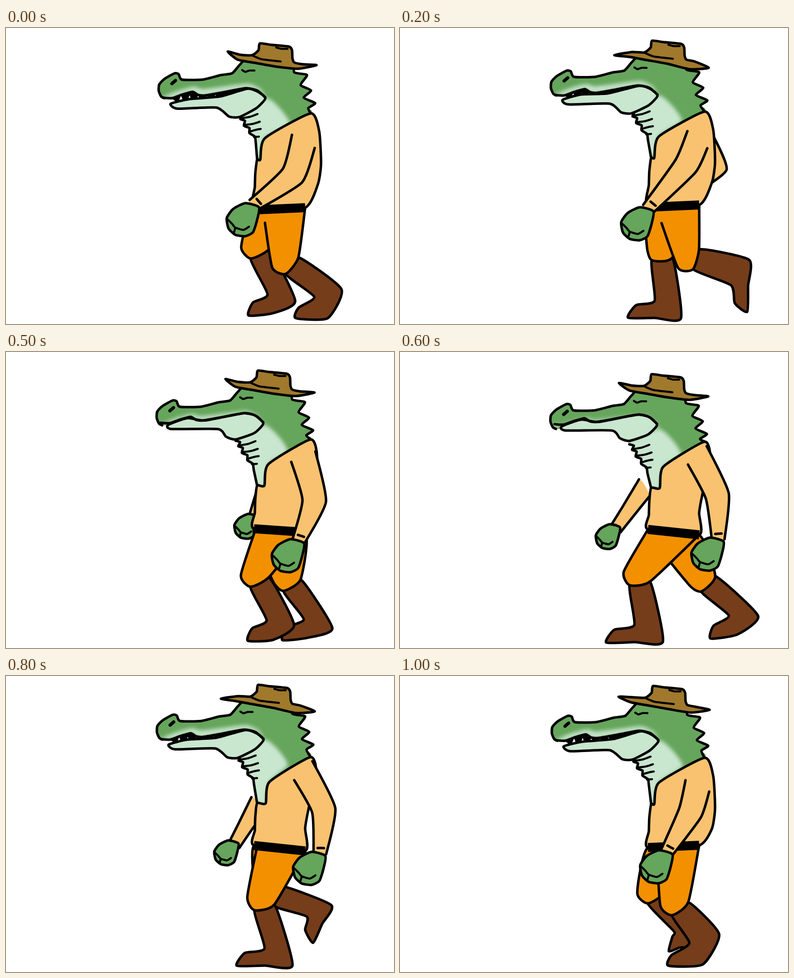
Recreate the animation shown at these times as an HTML page. Size 856 px wide and 654 px high, loop 1100 ms.

```html
<!DOCTYPE html>
<html lang="en">
<head>
<meta charset="utf-8">
<title>Walking crocodile</title>
<style>
  html, body { margin: 0; width: 100%; height: 100%; overflow: hidden; background: #fff; }
  svg { display: block; width: 100%; height: 100%; }
</style>
</head>
<body>
<svg id="stage" viewBox="0 0 856 654">
  <defs>
    <clipPath id="headClip"><path id="clipShape"/></clipPath>
    <filter id="soft" x="-20%" y="-30%" width="140%" height="160%"><feGaussianBlur stdDeviation="4"/></filter>
  </defs>
  <g id="art" stroke="#000" stroke-width="5.5" stroke-linejoin="round" stroke-linecap="round"></g>
</svg>
<script>
const GREEN = '#66a55c', PALE = '#c9e6cf', SHIRT = '#f8c270', ORANGE = '#f39000', BOOT = '#753d1a', HAT = '#a0792c';
const STEP = 100, STEPS = 11;

// head: offset; brim: droop; jaw: opening, below 0 clenched; turn: 1 with the near arm back;
// swing: far arm, -1 back to 1 forward; arm: elbow, wrist; legs: knee, heel, toe.
// Steps without a pose lie halfway between their neighbours.
const poses = {
  0: { head: [4, 1], brim: 0, jaw: 0.6, turn: 0, swing: 0, hip: 402,
    arm: [632, 326, 546, 391], near: [631, 525, 740, 577, 639, 641], far: [560, 499, 638, 603, 535, 635] },
  2: { head: [0, -5], brim: 1, jaw: 0.4, turn: 0, swing: -1, hip: 396,
    arm: [630, 305, 547, 400], near: [653, 511, 770, 512, 766, 627], far: [578, 510, 620, 641, 503, 640] },
  4: { head: [0, 0], brim: 0, jaw: 0, turn: 0.5, swing: 0, hip: 389,
    arm: [660, 340, 589, 421], near: [590, 505, 691, 566, 612, 634], far: [582, 518, 650, 637, 534, 640] },
  6: { head: [-1, 16], brim: 0.1, jaw: -0.6, turn: 1, swing: 1.15, hip: 392,
    arm: [700, 318, 702, 414], near: [529, 511, 580, 640, 455, 642], far: [680, 512, 790, 583, 685, 633] },
  7: { head: [0, -1], brim: 0.9, jaw: 0, turn: 1, swing: 0.98, hip: 384,
    arm: [707, 300, 713, 397], near: [547, 510, 612, 640, 491, 641], far: [619, 492, 738, 508, 715, 604] },
  9: { head: [0, -26], brim: 0.9, jaw: 1, turn: 1, swing: 0.88, hip: 365,
    arm: [695, 294, 672, 388], near: [593, 512, 652, 639, 527, 639], far: [572, 478, 697, 504, 640, 575] },
  10: { head: [2, -11], brim: 0.4, jaw: 0.6, turn: 0, swing: 0, hip: 379,
    arm: [640, 302, 589, 389], near: [618, 514, 704, 570, 592, 640], far: [566, 490, 640, 592, 593, 608] }
};

const parse = text => text.split(' ').map(p => p.split(',').map(Number));
const lerp = (a, b, t) => a + (b - a) * t;
const mix = (a, b, t) => a.map((v, i) => lerp(v, b[i], t));
const clamp = v => Math.max(0, Math.min(1, v));
const move = (p, dir, d) => [p[0] + dir[0] * d, p[1] + dir[1] * d];
const shift = (pts, dx, dy, k = 1) => pts.map(([x, y]) => [x * k + dx, y * k + dy]);
const pairs = list => list.flatMap((v, i) => i % 2 ? [] : [[v, list[i + 1]]]);
function unit(a, b) {
  const d = Math.hypot(b[0] - a[0], b[1] - a[1]);
  return [(b[0] - a[0]) / d, (b[1] - a[1]) / d];
}

function poseAt(step) {
  if (poses[step]) return poses[step];
  const a = poses[step - 1], b = poses[step + 1];
  return Object.fromEntries(Object.keys(a).map(key =>
    [key, Array.isArray(a[key]) ? mix(a[key], b[key], 0.5) : lerp(a[key], b[key], 0.5)]));
}

// Catmull-Rom with a low tension: corners stay, long runs soften.
function curve(pts, closed, k = 0.1) {
  const n = pts.length;
  const at = i => closed ? pts[(i + n) % n] : pts[Math.max(0, Math.min(n - 1, i))];
  let d = 'M' + pts[0];
  for (let i = 0; i < (closed ? n : n - 1); i++) {
    const [a, b, c, e] = [at(i - 1), at(i), at(i + 1), at(i + 2)];
    d += `C${move(b, [c[0] - a[0], c[1] - a[1]], k)} ${move(c, [e[0] - b[0], e[1] - b[1]], -k)} ${c}`;
  }
  return d + (closed ? 'Z' : '');
}

const SVG = 'http://www.w3.org/2000/svg';
const art = document.getElementById('art');
const layers = { clip: document.getElementById('clipShape') };
function layer(name, fill, attrs = {}, parent = art) {
  const node = document.createElementNS(SVG, 'path');
  for (const [key, value] of Object.entries({ fill, ...attrs })) node.setAttribute(key, value);
  layers[name] = parent.appendChild(node);
}
const set = (name, d) => layers[name].setAttribute('d', d);
const shape = (name, pts) => set(name, curve(pts, true));
const line = (name, ...runs) => set(name, runs.map(run => curve(run)).join(''));
const bare = { stroke: 'none' }, thin = { 'stroke-width': 4.5 };

function armLayers(side) {
  layer(side + 'Arm', SHIRT, bare);
  layer(side + 'ArmLines', 'none');
  layer(side + 'Hand', GREEN);
  layer(side + 'Fingers', 'none', thin);
}
armLayers('far');
layer('farBoot', BOOT);
layer('farShorts', ORANGE);
layer('nearBoot', BOOT);
layer('nearShorts', ORANGE);
layer('head', GREEN, bare);
const glow = art.appendChild(document.createElementNS(SVG, 'g'));
glow.setAttribute('clip-path', 'url(#headClip)');
layer('throat', PALE, { ...bare, filter: 'url(#soft)' }, glow);
layer('lipGlow', PALE, { ...bare, filter: 'url(#soft)' }, glow);
layer('headLine', 'none');
layer('wrinkles', 'none', thin);
layer('mouth', '#000', bare);
layer('teeth', '#eee', bare);
layer('jaw', PALE);
layer('lip', 'none');
layer('nostril', 'none', { 'stroke-width': 7 });
layer('eye', 'none', thin);
layer('hat', HAT);
layer('hatLines', 'none', thin);
layer('body', SHIRT);
layer('belt', 'none', { 'stroke-width': 20, 'stroke-linecap': 'butt' });
armLayers('near');

const JAW_SHUT = parse('358,158 366,167 468,167 486,184 507,190 548,176 568,155 552,138 525,132 440,148 400,143');
const JAW_OPEN = parse('360,172 380,184 455,180 490,202 515,199 550,175 568,155 555,143 530,134 487,152 400,165');
const HAND = parse('-18,-4 -45,9 -59,29 -55,52 -40,66 -18,69 -1,60 8,33 12,5');
const KNUCKLES = parse('-57,32 -47,42 -40,50 -22,55 -10,48');
const FINGER = parse('-40,50 -43,61');

function drawHead({ head: [ox, oy], jaw }, { nape, collar, vRight, vLeft }) {
  const h = text => shift(parse(text), ox, oy);
  const clench = oy + 16 * Math.min(jaw, 0);
  const top = [...h('345,154 338,150 333,138 334,124 345,112 368,99 377,101 384,113 430,113 470,103 495,99 512,80 530,68 625,72 632,97 660,103 646,125 669,137 653,153 678,165 663,176'), nape];
  const neck = [...h('507,188 517,191 513,200 523,204 521,215 533,220 533,231 545,239 547,252'), vLeft];
  const lip = shift(parse('342,153 362,154 385,146 408,140 420,147 435,148 470,142 525,132 550,137 568,152'), ox, clench);
  const outline = [...top, collar, vRight, ...neck.slice().reverse(), ...h('480,155')];
  shape('head', outline);
  shape('clip', outline);
  shape('throat', [...h('500,185 568,154 590,166 609,187 621,212'), collar, vRight, vLeft, ...h('530,245 500,200')]);
  shape('lipGlow', [...h('336,154 375,138 410,129 430,134 480,128 530,122 558,134 572,158'), ...lip.slice().reverse()]);
  line('headLine', top, neck);
  line('wrinkles', h('518,198 535,195 551,189'), h('523,213 540,211 556,206'), h('534,228 547,224 558,222'), h('543,240 554,239'));

  const lower = shift(JAW_SHUT.map((p, i) => mix(p, JAW_OPEN[i], Math.max(jaw, 0))), ox, clench);
  shape('mouth', [...lip.slice(1, 8), ...lower.slice(8), mix(lower[10], lower[0], 0.6)]);
  let teeth = '';
  for (let i = 0; i < 6; i++) teeth += `M${382 + i * 19 + ox},${148 - i * 0.5 + clench}l-5,13h10z`;
  set('teeth', teeth);
  shape('jaw', lower);
  line('lip', lip);
  line('nostril', h('362,122 370,115'));
  line('eye', h('517,92 524,96 533,93 544,93'));
}

function drawHat({ head: [ox, oy], brim }) {
  const h = text => shift(parse(text), ox, oy);
  const at = (x, y) => [x + ox, y + oy];
  shape('hat', [at(485 - 12 * brim, 51 + 14 * brim), ...h('512,58 539,59 553,48 556,33 580,36 620,40 627,48 628,66 632,75 650,79'),
    at(681, 81 + 12 * brim), at(640, 89 + 7 * brim), ...h('590,84 545,76 507,69')]);
  line('hatLines', h('540,60 560,68 602,73'), h('592,42 603,45 617,45'));
}

// A sleeve around shoulder, elbow and wrist; the shoulder seam tilts further than the upper arm.
function drawArm(side, [shoulder, elbow, wrist], widths, size) {
  const tilt = (a, b) => Math.atan2(a[0] - b[0], b[1] - a[1]);
  const upper = tilt(shoulder, elbow), lower = tilt(elbow, wrist);
  const angles = [upper * 1.7, (upper + lower) / 2, lower];
  const edge = sign => [shoulder, elbow, wrist].map((p, i) =>
    move(p, [Math.cos(angles[i]), Math.sin(angles[i])], sign * widths[i]));
  const front = edge(-1), back = edge(1);
  const cuff = [0.3, 0.75].map(t => mix(mix(front[1], front[2], 0.87), mix(back[1], back[2], 0.87), t));
  shape(side + 'Arm', [...front, ...back.slice().reverse()]);
  line(side + 'ArmLines', front, back, cuff);
  const place = pts => shift(pts, wrist[0], wrist[1] + (size - 1) * 28, size);
  shape(side + 'Hand', place(HAND));
  line(side + 'Fingers', place(KNUCKLES), place(FINGER));
}

// Boot and knee follow from the knee centre, the heel and the toe tip.
function drawLeg(side, [knee, heel, toe], beltL, beltR) {
  const along = unit(heel, toe), up = [-along[1], along[0]];
  const length = Math.hypot(toe[0] - heel[0], toe[1] - heel[1]);
  const bend = clamp((toe[1] - 628) / 10) * clamp((620 - heel[1]) / 40);
  const instep = move(move(heel, along, length / 2), up, 38 - 20 * bend);
  const toeTop = move(move(toe, up, 28 - 12 * bend), along, -18);
  const ball = move(mix(toe, heel, 0.5), up, -38 * bend);
  const shin = unit(knee, mix(instep, heel, 0.5)), across = [shin[1], -shin[0]];
  const topFront = move(knee, across, -23), topBack = move(knee, across, 23);
  const kneecap = move(move(knee, across, -30), shin, -32);
  shape(side + 'Boot', [topFront, instep, toeTop, toe, ball, heel, topBack]);

  if (side === 'far') return shape('farShorts', [beltL, beltR, topBack, topFront, kneecap]);
  const behind = clamp((knee[0] - 550) / 100);
  line('nearShorts', [move(beltL, [30, 35], behind), kneecap, topFront, topBack, beltR]);
}

function draw(step) {
  const pose = poseAt(step);
  const { turn, swing, hip } = pose;
  const drop = pose.head[1] * 0.65;
  const at = (x, y) => [x, y + drop];
  const chest = { nape: at(672, 188), collar: at(571 + 10 * turn, 243), vRight: at(561 + 12 * turn, 290), vLeft: at(554, 290) };
  const beltL = [547, hip], beltR = [660, hip - 5 + 17 * turn];

  const hidden = parse('625,265 620,310 620,345');
  const reach = parse(swing < 0 ? '668,240 705,311 635,361' : '550,291 520,340 495,380');
  const farArm = hidden.map((p, i) => mix(p, reach[i], Math.abs(swing)));
  drawArm('far', shift(farArm, 0, drop / 2), [22, 16, 13], 0.75);
  drawLeg('far', pairs(pose.far), beltL, beltR);
  drawLeg('near', pairs(pose.near), beltL, beltR);
  drawHead(pose, chest);
  drawHat(pose);
  shape('body', [chest.nape, chest.collar, chest.vRight, chest.vLeft, at(550, 320), at(549, 350), beltL, beltR,
    at(688 - 28 * turn, 345), at(695 - 27 * turn, 300), at(691 - 6 * turn, 228)]);
  line('belt', [beltL, beltR]);
  drawArm('near', [at(656, 250 - 32 * turn), ...pairs(pose.arm)], [29, 26, 14], 1);
}

const start = performance.now();
let shown = -1;
function tick() {
  const step = Math.floor((performance.now() - start) / STEP) % STEPS;
  if (step !== shown) draw(shown = step);
  requestAnimationFrame(tick);
}
tick();
</script>
</body>
</html>
```
